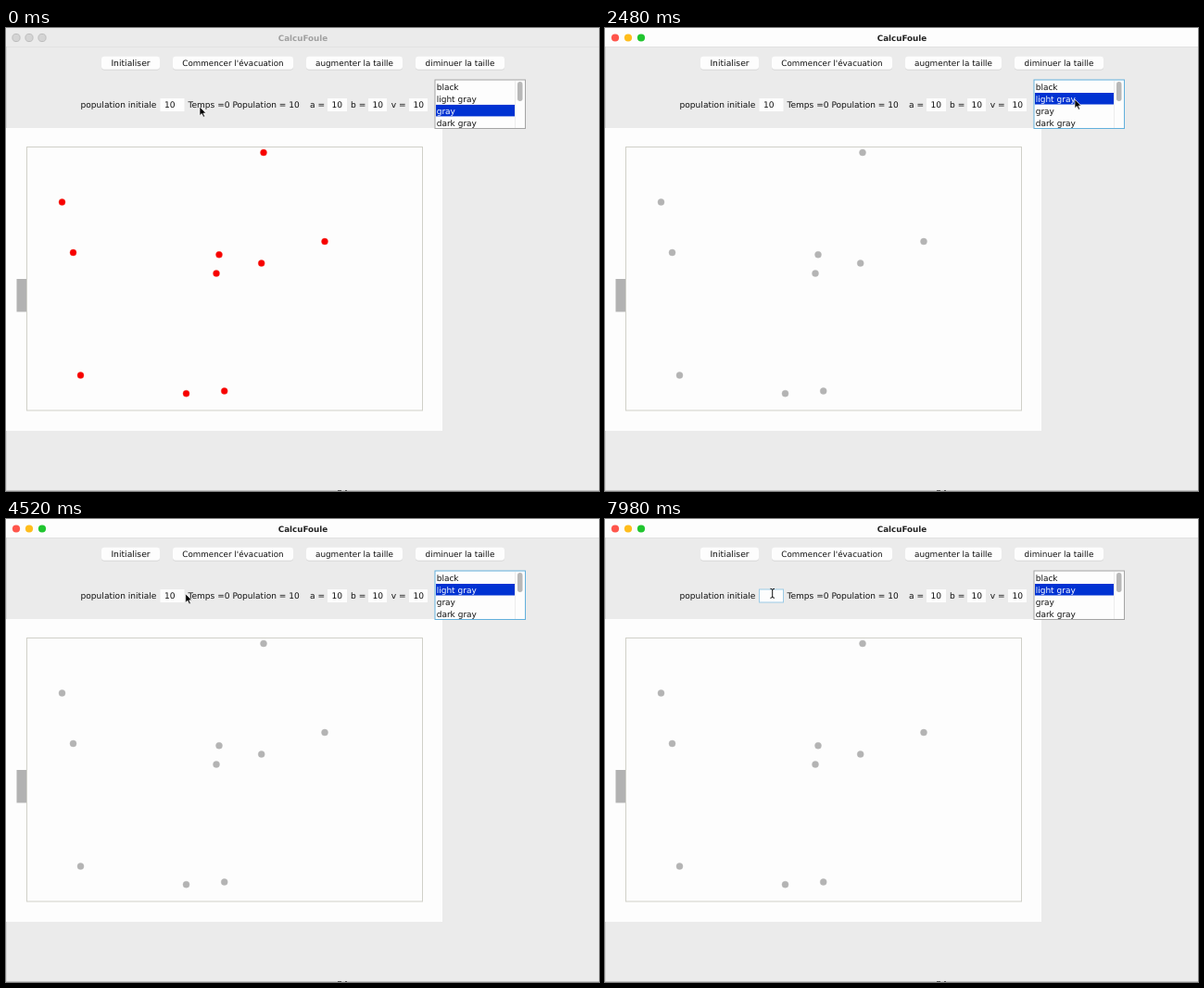
Recreate the animation shown at these times as an HTML page. Size 640 by 500 pixels, loop 8000 ms.

```html
<!DOCTYPE html>
<html lang="fr">
<head>
<meta charset="utf-8">
<title>CalcuFoule</title>
<style>
  html, body { margin: 0; width: 100%; height: 100%; overflow: hidden; background: #ebebeb; }
  svg { display: block; width: 640px; height: 500px; }
  text { font-family: "DejaVu Sans", sans-serif; font-size: 9px; fill: #111; white-space: pre; text-rendering: geometricPrecision; }
</style>
</head>
<body>
<svg id="stage" viewBox="0 0 640 500"></svg>
<script>
const LOOP = 8000;
const SELECT = 2400, FOCUS = 4860, ERASE = [6600, 7440];
const BG = '#ebebeb', GRAY = '#b4b4b4';
const stage = document.getElementById('stage');

function add(tag, attrs, parent = stage) {
  const el = document.createElementNS('http://www.w3.org/2000/svg', tag);
  set(el, attrs);
  parent.appendChild(el);
  return el;
}
function set(el, attrs) {
  for (const k in attrs) el.setAttribute(k, attrs[k]);
}
function rect(x, y, width, height, fill, more) {
  return add('rect', { x, y, width, height, fill, ...more });
}
function label(x, y, str, size = 9, more) {
  const el = add('text', { x, y, ...more });
  el.style.fontSize = size + 'px';
  el.textContent = str;
  return el;
}

// Window and title bar
rect(0, 0, 640, 500, BG);
const bar = rect(0, 0, 640, 20, BG);
rect(0, 20, 640, .6, '#dcdcdc');
rect(0, 20, .7, 480, '#cfcfcf');
rect(0, 499, 640, 1, '#c4c4c4');
rect(358, 499, 4, 1, '#555');
rect(366, 499, 2, 1, '#555');
const lights = [11, 25, 39].map(cx => add('circle', { cx, cy: 10.5, r: 4.1 }));
const LIGHT_COLORS = ['#ff554b', '#ffbd1c', '#20c52f'];
const title = label(320.5, 13.6, 'CalcuFoule', 8.75, { 'text-anchor': 'middle', 'font-weight': 'bold' });

// Buttons
[[103, 63, 'Initialiser', 9.2], [180, 130, "Commencer l'évacuation", 8.75],
 [324, 104, 'augmenter la taille', 8.85], [442, 96, 'diminuer la taille', 8.9]].forEach(([x, w, str, size]) => {
  rect(x, 31.6, w, 14, '#cfcfcf', { rx: 3 });
  rect(x, 30.8, w, 14, '#fdfdfd', { rx: 3 });
  label(x + w / 2, 40.7, str, size, { 'text-anchor': 'middle' });
});

// Form row
label(80.5, 86, 'population initiale', 9.1);
label(196.5, 86, 'Temps =0 Population = 10', 9.05);
label(328, 86, 'a =', 9.1);
label(372, 86, 'b =', 9.1);
label(415.7, 86, 'v =', 9.1);
const FIELDS = [[166.5, 26], [347, 21], [391, 20], [435, 20]];
const [popBox] = FIELDS.map(([x, w]) => rect(x, 76, w, 14, '#fdfdfd'));
const [popText] = FIELDS.map(([x]) => label(x + 4.4, 86, '10', 9.1));
const caret = rect(0, 77.5, .9, 10.5, '#111');

// Room, exit and people
rect(0, 108, 471, 327, '#fdfdfd');
rect(22.5, 128.5, 427, 284.5, 'none', { stroke: '#d0d0c8', 'stroke-width': 1 });
rect(11.5, 271, 10.5, 35.5, '#b2b2b2');
const people = [[278, 134.5], [60.5, 188], [72.5, 242.5], [230, 244.7], [227, 265], [275.7, 254],
  [344, 230.5], [80.5, 375], [194.5, 394.7], [235.7, 392]].map(([cx, cy]) =>
  add('circle', { cx, cy, r: 3.5, 'stroke-width': .4 }));

// Colour list
const list = rect(463, 56, 97.5, 52.5, '#fdfdfd', { 'stroke-width': 1 });
const highlight = rect(464, 0, 85, 12.5, '#0032d2');
add('path', { d: 'M549.5 57V108', stroke: '#e8e8e8', 'stroke-width': .8 });
rect(552, 58, 5.5, 21, '#b8b8b8', { rx: 2.7 });
const items = ['black', 'light gray', 'gray', 'dark gray'].map((str, i) => label(464.7, 66.8 + 12.9 * i, str, 9));

// Pointers
const arrow = add('path', {
  d: 'M0 0V9.6L2.3 7.5L4 11.2L5.6 10.5L4 7H7Z',
  fill: '#000', stroke: '#fff', 'stroke-width': .7
});
const beam = add('path', {
  d: 'M-2.3 -5Q0 -5 0 -3.5Q0 -5 2.3 -5M0 -4V4M-2.3 5Q0 5 0 3.5Q0 5 2.3 5',
  fill: 'none', stroke: '#111', 'stroke-width': 1
});

// Moves: start, end, from, to, downward bow
const MOVES = [
  [400, 1820, [209, 85], [495, 98], 0],
  [1820, 2300, [495, 98], [507, 77], 0],
  [2680, 4773, [507, 77], [180.7, 80.3], 4.5]
];
function pointer(t) {
  const [start, end, a, b, bow] = MOVES.filter(m => t >= m[0]).pop() || MOVES[0];
  const u = Math.min(1, Math.max(0, (t - start) / (end - start)));
  const e = u * u * (3 - 2 * u);
  return [a[0] + (b[0] - a[0]) * e, a[1] + (b[1] - a[1]) * e + bow * Math.sin(Math.PI * e)];
}

function draw(t) {
  const active = t >= SELECT, typing = t >= FOCUS;

  set(bar, { fill: active ? '#fdfdfd' : BG });
  title.style.fill = active ? '#222' : '#a0a0a0';
  lights.forEach((el, i) => set(el, {
    fill: active ? LIGHT_COLORS[i] : '#d4d4d4',
    stroke: active ? 'none' : '#bdbdbd'
  }));

  const row = active ? 1 : 2;
  set(highlight, { y: 57.1 + 12.9 * row });
  items.forEach((el, i) => el.style.fill = i === row ? '#fff' : '#111');
  set(list, { stroke: active && !typing ? '#62b0dc' : '#a4a4a4' });
  people.forEach(el => set(el, { fill: active ? GRAY : '#f80000', stroke: active ? GRAY : '#f04030' }));

  const gone = ERASE.filter(k => t >= k).length;
  popText.textContent = '10'.slice(0, 2 - gone);
  set(popBox, { stroke: typing ? '#9ccbe6' : 'none' });
  const since = t - (gone ? ERASE[gone - 1] : FOCUS);
  set(caret, {
    x: 171 + 5.8 * (2 - gone),
    visibility: typing && since % 1000 < 500 ? 'visible' : 'hidden'
  });

  const [x, y] = pointer(t);
  const overField = y > 76 && y < 90 && FIELDS.some(([fx, w]) => x > fx && x < fx + w);
  const transform = `translate(${x} ${y})`;
  set(arrow, { transform, visibility: overField ? 'hidden' : 'visible' });
  set(beam, { transform, visibility: overField ? 'visible' : 'hidden' });
}

const begin = performance.now();
function tick() {
  draw((performance.now() - begin) % LOOP);
  requestAnimationFrame(tick);
}
tick();
</script>
</body>
</html>
```
